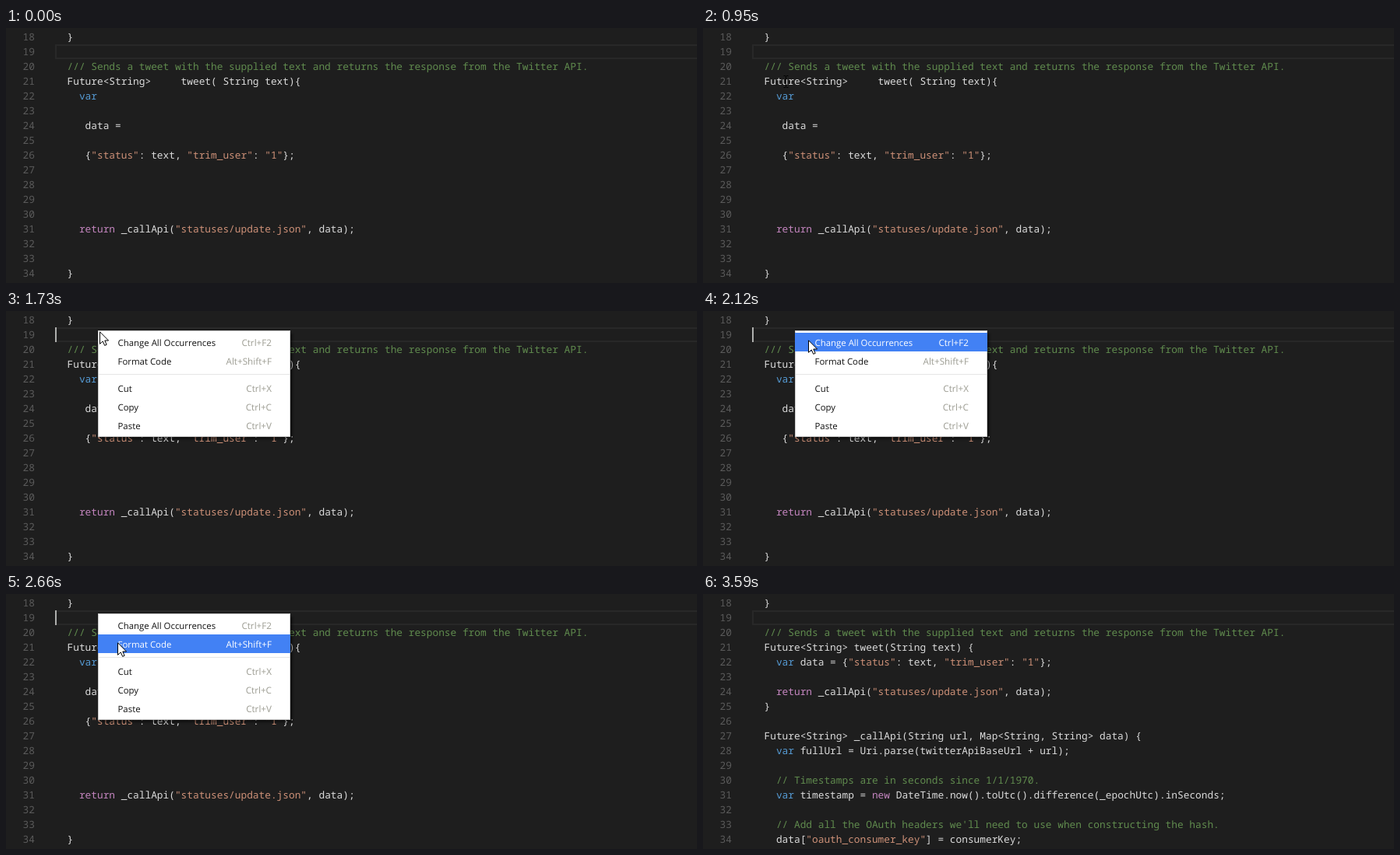
Animation, 887 px wide and 328 px high, one loop 5.05 s. Source, as an HTML page:

```html
<!DOCTYPE html>
<html lang="en">
<head>
<meta charset="utf-8">
<title>Format Code</title>
<style>
  html, body { margin: 0; width: 100%; height: 100%; overflow: hidden; background: #1e1e1e; }
  svg { display: block; }
  text { white-space: pre; text-rendering: geometricPrecision; }
  .code { font: 12.829px "Noto Sans Mono", "DejaVu Sans Mono", monospace; fill: #dcdcdc; }
  .number { fill: #5a5a5a; }
  .comment { fill: #608b4e; }
  .string { fill: #ce9178; }
  .keyword { fill: #569cd6; }
  .control { fill: #c586c0; }
  .item { font: 11.42px "Open Sans", "Noto Sans", sans-serif; fill: #111; }
  .shortcut { font-size: 11.7px; fill: #9c9c92; text-anchor: end; }
  .item rect { fill: none; }
  .item.hover rect { fill: #4281f4; }
  .item.hover text { fill: #fff; }
</style>
</head>
<body>
<svg width="887" height="328" viewBox="0 0 887 328">
  <defs>
    <filter id="blur" x="-10%" y="-10%" width="120%" height="120%"><feGaussianBlur stdDeviation="1.5"/></filter>
  </defs>
  <rect x="64" y="22" width="830" height="17" fill="none" stroke="#282828" stroke-width="2"/>
  <g id="numbers" class="code"></g>
  <g id="before" class="code"></g>
  <g id="after" class="code"></g>
  <rect id="caret" x="63" y="21" width="2" height="19" fill="#aeafad"/>
  <g id="menu">
    <rect x="122" y="29" width="246" height="136" fill="#000" opacity=".45" filter="url(#blur)"/>
    <rect x="118.5" y="25.5" width="246" height="136" fill="#fff" stroke="#ccc"/>
    <rect x="119" y="81" width="245" height="1" fill="#e6e6e6"/>
    <g id="items"></g>
  </g>
  <path id="ibeam" d="M-3 -7.5h2.5M.5 -7.5h2.5M0 -7v14M-3 7.5h2.5M.5 7.5h2.5" fill="none" stroke="#000"/>
  <path id="arrow" d="M.5 .8V16.4L4.2 12.9 6.7 18.4 9.2 17.3 6.8 12H11.6Z" fill="#fff" stroke="#000"/>
</svg>
<script>
const LOOP = 5050, FIRST_LINE = 18, LINE_HEIGHT = 19;
const MENU_OPEN = 1730, FORMATTED = 2960, CARET_OFF = 3510;
const $ = id => document.getElementById(id);

const head = `}

/// Sends a tweet with the supplied text and returns the response from the Twitter API.
`;
const messy = head + `Future<String>     tweet( String text){
  var

   data =

   {"status": text, "trim_user": "1"};




  return _callApi("statuses/update.json", data);


}`;
const tidy = head + `Future<String> tweet(String text) {
  var data = {"status": text, "trim_user": "1"};

  return _callApi("statuses/update.json", data);
}

Future<String> _callApi(String url, Map<String, String> data) {
  var fullUrl = Uri.parse(twitterApiBaseUrl + url);

  // Timestamps are in seconds since 1/1/1970.
  var timestamp = new DateTime.now().toUtc().difference(_epochUtc).inSeconds;

  // Add all the OAuth headers we'll need to use when constructing the hash.
  data["oauth_consumer_key"] = consumerKey;`;

const kinds = ["comment", "string", "keyword", "control"];
const highlight = line => line.replace(/</g, "&lt;").replace(
  /(\/\/.*)|("[^"]*")|\b(var)\b|\b(return|new)\b/g,
  (token, ...groups) => `<tspan class="${kinds[groups.findIndex(Boolean)]}">${token}</tspan>`);

const textLines = (lines, x, cls = "") => lines.map((line, i) =>
  `<text class="${cls}" x="${x}" y="${16 + i * LINE_HEIGHT}">${line}</text>`).join("");

const showCode = (id, source) =>
  $(id).innerHTML = textLines(source.split("\n").map(highlight), 78.5);

showCode("before", messy);
showCode("after", tidy);
$("numbers").innerHTML = textLines(Array.from({ length: 17 }, (_, i) => FIRST_LINE + i), 21.5, "number");

const menuItems = [
  ["Change All Occurrences", "Ctrl+F2", 29],
  ["Format Code", "Alt+Shift+F", 53],
  ["Cut", "Ctrl+X", 88],
  ["Copy", "Ctrl+C", 112],
  ["Paste", "Ctrl+V", 136],
];
$("items").innerHTML = menuItems.map(([label, keys, y]) => `<g class="item">
  <rect x="118" y="${y - 1}" width="247" height="24"/>
  <text x="143.5" y="${y + 16}">${label}</text>
  <text class="shortcut" x="341" y="${y + 16}">${keys}</text></g>`).join("");
const itemNodes = [...$("items").children];

// Pointer moves: shape, first and last step time, step count, start, end
const moves = [
  ["ibeam", 490, 800, 5, [329.5, 288], [106.5, 90]],
  ["ibeam", 950, 1420, 7, [106.5, 69], [122.5, 28]],
  ["ibeam", 1490, 1490, 1, [122.5, 27], [122.5, 27]],
  ["arrow", 1660, 1660, 1, [120, 26], [120, 26]],
  ["arrow", 2040, 2040, 1, [128, 31], [128, 31]],
  ["arrow", 2120, 2500, 6, [135, 37], [143, 59]],
  ["arrow", 2580, 2660, 2, [143, 60], [143, 62]],
  ["ibeam", 3130, 3280, 3, [186, 78], [270.5, 111]],
  ["ibeam", 3430, 3510, 2, [430, 188], [623.5, 288]],
  ["none", 3590, 3590, 1, [0, 0], [0, 0]],
];

function pointerAt(t) {
  const move = moves.findLast(m => t >= m[1]);
  if (!move) return { shape: "none", x: 0, y: 0 };
  const [shape, start, end, count, from, to] = move;
  const last = count - 1;
  const step = last ? Math.min(last, Math.floor((t - start) / (end - start) * last + 0.05)) : 0;
  const [x, y] = from.map((v, i) => v + (to[i] - v) * (last ? step / last : 0));
  return { shape, x: shape === "arrow" ? Math.round(x) : Math.floor(x) + 0.5, y: Math.round(y) };
}

const show = (id, on) => $(id).style.display = on ? "" : "none";

function draw(now) {
  const t = now % LOOP;
  const pointer = pointerAt(t);
  show("before", t < FORMATTED);
  show("after", t >= FORMATTED);
  show("caret", t >= MENU_OPEN && t < CARET_OFF);
  show("menu", t >= MENU_OPEN && t < FORMATTED);
  itemNodes.forEach((node, i) => {
    const top = menuItems[i][2];
    node.classList.toggle("hover", pointer.y >= top && pointer.y < top + 24);
  });
  for (const shape of ["ibeam", "arrow"]) {
    show(shape, pointer.shape === shape);
    $(shape).setAttribute("transform", `translate(${pointer.x} ${pointer.y})`);
  }
}

const began = performance.now();
function tick() {
  draw(performance.now() - began);
  requestAnimationFrame(tick);
}
tick();
</script>
</body>
</html>
```
